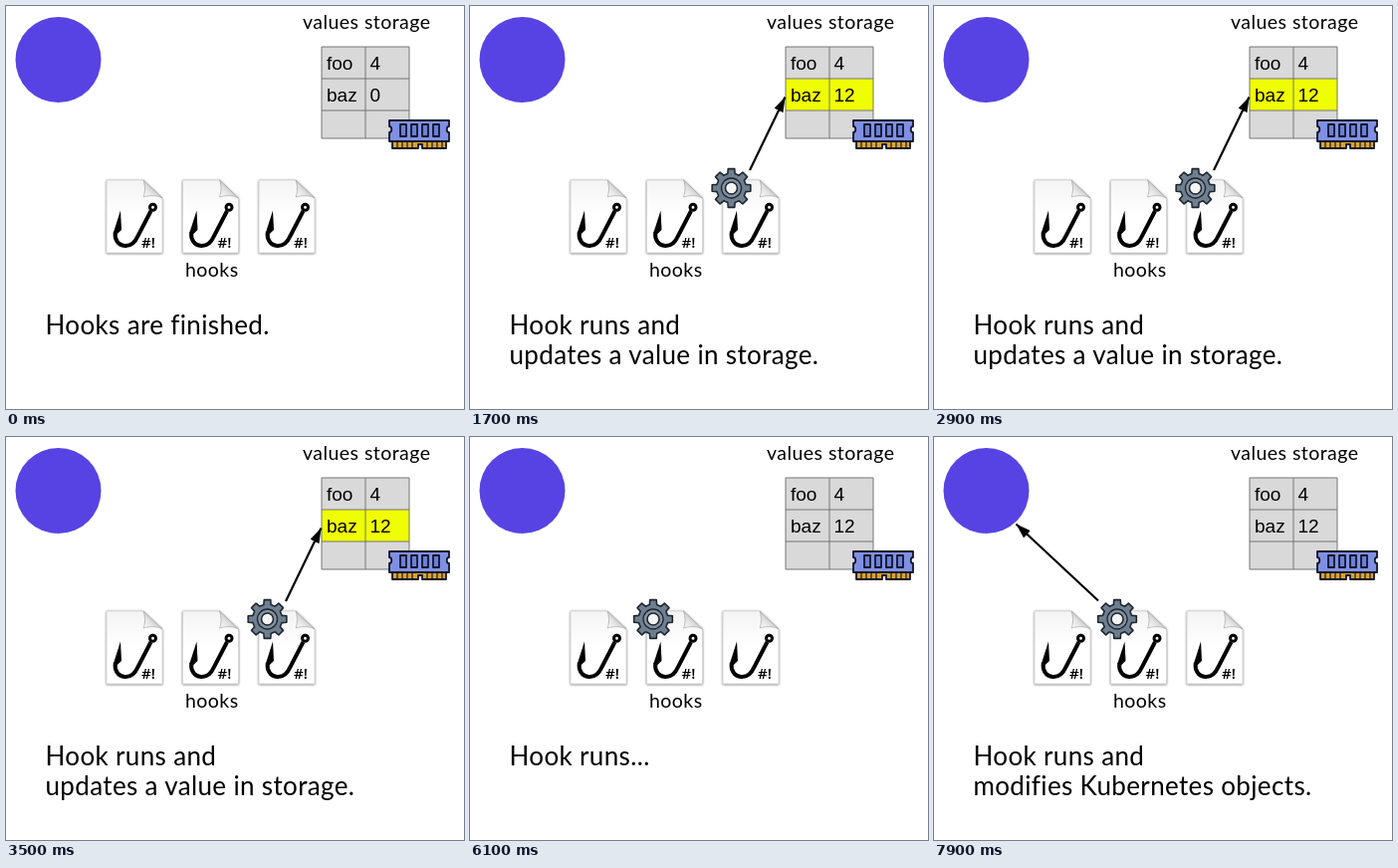
These frames come from a looping animation (460x405 px, 8000 ms). An HTML page:

```html
<!DOCTYPE html>
<html lang="en">
<head>
<meta charset="utf-8">
<title>Hooks and values storage</title>
<style>
  html, body { margin: 0; width: 100%; height: 100%; overflow: hidden; background: #fff; }
  svg { display: block; width: 460px; height: 405px; }
  .caption { font: 26px Lato, sans-serif; letter-spacing: .35px; }
  .label { font: 19.5px Lato, sans-serif; letter-spacing: .45px; }
  .cell { font: 19px "Liberation Sans", Arial, sans-serif; }
  .shebang { font: 600 15px "Open Sans", sans-serif; }
</style>
</head>
<body>
<svg viewBox="0 0 460 405">
  <defs>
    <linearGradient id="paper" x2="0" y2="1">
      <stop offset="0" stop-color="#f4f4f4"/>
      <stop offset=".5" stop-color="#fff"/>
    </linearGradient>
    <linearGradient id="fold" x1="0" y1="1" x2="1" y2="0">
      <stop offset="0" stop-color="#fff"/>
      <stop offset=".35" stop-color="#e4e4e4"/>
      <stop offset="1" stop-color="#8c8c8c"/>
    </linearGradient>
    <filter id="shadow" x="-20%" y="-20%" width="140%" height="140%">
      <feDropShadow dx="0" dy=".6" stdDeviation="1.3" flood-opacity=".6"/>
    </filter>
    <marker id="head" viewBox="0 0 15 10" refX="15" refY="5" markerWidth="15" markerHeight="10"
            markerUnits="userSpaceOnUse" orient="auto">
      <path d="M0 0L15 5L0 10Z"/>
    </marker>
    <g id="hook">
      <path d="M1 1H38L57 19V74H1Z" fill="url(#paper)" stroke="#c4c4c4" stroke-width=".6" filter="url(#shadow)"/>
      <path d="M38 1C40 7 40 13 38 18C45 16 51 16 57 19Z" fill="url(#fold)" stroke="#999" stroke-width=".6"/>
      <g fill="none" stroke="#000">
        <circle cx="47.5" cy="28.3" r="3" stroke-width="3"/>
        <path d="M45.500 32L32.500 57C29.500 64 25 67.300 19.500 67C12 66.500 8.800 60 9.800 53" stroke-width="4"/>
      </g>
      <path d="M7.800 54L15 31.500L16 51L11.800 55Z"/>
      <text class="shebang" x="36" y="69">#!</text>
    </g>
  </defs>

  <circle cx="52.5" cy="54" r="43" fill="#5743e3"/>

  <text class="label" x="298" y="23">values storage</text>
  <rect x="317" y="41" width="88" height="92" fill="#d9d9d9"/>
  <rect id="highlight" x="317" y="73" width="88" height="32" fill="#f0ff00"/>
  <path d="M317 41H405V133H317ZM361 41V133M317 73H405M317 105H405" fill="none" stroke="#757575"/>
  <g class="cell">
    <text x="322" y="64">foo</text><text x="365.5" y="64">4</text>
    <text x="322" y="96">baz</text><text id="baz" x="365.5" y="96"></text>
  </g>

  <g stroke="#101428" stroke-width="1.8" stroke-linejoin="round">
    <path d="M388 134H442V143H418V139H414V143H388Z" fill="#dba52c"/>
    <path d="M393 136V143M398 136V143M403 136V143M408 136V143M423 136V143M428 136V143M433 136V143M438 136V143"
          stroke-width="1.2"/>
    <path d="M385 115H445V121C442 121 442 127 445 127V136H385V127C388 127 388 121 385 121Z" fill="#7f90e4"/>
    <path d="M396 119H402V131H396ZM407 119H413V131H407ZM418 119H424V131H418ZM429 119H435V131H429Z" fill="#6c7fd6"/>
  </g>

  <use href="#hook" x="100" y="174"/>
  <use href="#hook" x="176.5" y="174"/>
  <use href="#hook" x="253" y="174"/>
  <text class="label" x="180" y="272">hooks</text>

  <path id="arrow" stroke="#000" stroke-width="2.2" marker-end="url(#head)"/>
  <g id="gear" stroke="#1d2630" stroke-linejoin="round">
    <path id="teeth" fill="#6f7f8f" stroke-width="1.6"/>
    <circle r="10" fill="#8593a1" stroke-width="1.3"/>
    <circle r="6" fill="#f4f4f4" stroke-width="1.6"/>
  </g>

  <text id="line1" class="caption" x="39.5" y="329.5"></text>
  <text id="line2" class="caption" x="39.5" y="360"></text>
</svg>
<script>
const LOOP = 8000, STEP = 200, TEETH = 8;
const idle = { line1: "Hooks are finished." };
const running = { line1: "Hook runs..." };

// Each scene lasts until the next one starts.
const scenes = [
  { start: 0, ...idle, baz: 0 },
  { start: 500, ...running, baz: 0, gearX: 262.5, spinFrom: 500 },
  { start: 1700, line1: "Hook runs and", line2: "updates a value in storage.", baz: 12,
    gearX: 262.5, spinFrom: 500, highlight: true, arrow: "M281 165L316.500 91.500" },
  { start: 4100, ...idle, baz: 12 },
  { start: 6100, ...running, baz: 12, gearX: 184, spinFrom: 6100 },
  { start: 7300, line1: "Hook runs and", line2: "modifies Kubernetes objects.", baz: 12,
    gearX: 184, spinFrom: 6100, arrow: "M165 164.500L82.500 87.500" },
];

const el = id => document.getElementById(id);
const show = (id, visible) => el(id).setAttribute("visibility", visible ? "visible" : "hidden");

function gearPath() {
  const corners = [[-14, 15], [-9.5, 19.6], [9.5, 19.6], [14, 15]];
  const points = [];
  for (let tooth = 0; tooth < TEETH; tooth++) {
    for (const [offset, radius] of corners) {
      const angle = (tooth * 360 / TEETH + offset - 90) * Math.PI / 180;
      points.push(`${radius * Math.cos(angle)} ${radius * Math.sin(angle)}`);
    }
  }
  return `M${points.join("L")}Z`;
}

function render(time) {
  const scene = scenes.findLast(s => s.start <= time);
  el("line1").textContent = scene.line1;
  el("line2").textContent = scene.line2 || "";
  el("baz").textContent = scene.baz;
  show("highlight", scene.highlight);
  show("arrow", scene.arrow);
  el("arrow").setAttribute("d", scene.arrow || "M0 0");
  show("gear", scene.gearX);
  if (scene.gearX) {
    const angle = Math.floor((time - scene.spinFrom) / STEP) * 15;
    el("gear").setAttribute("transform", `translate(${scene.gearX} 183) rotate(${angle})`);
  }
}

el("teeth").setAttribute("d", gearPath());
const origin = performance.now();
function tick() {
  render((performance.now() - origin) % LOOP);
  requestAnimationFrame(tick);
}
tick();
</script>
</body>
</html>
```
